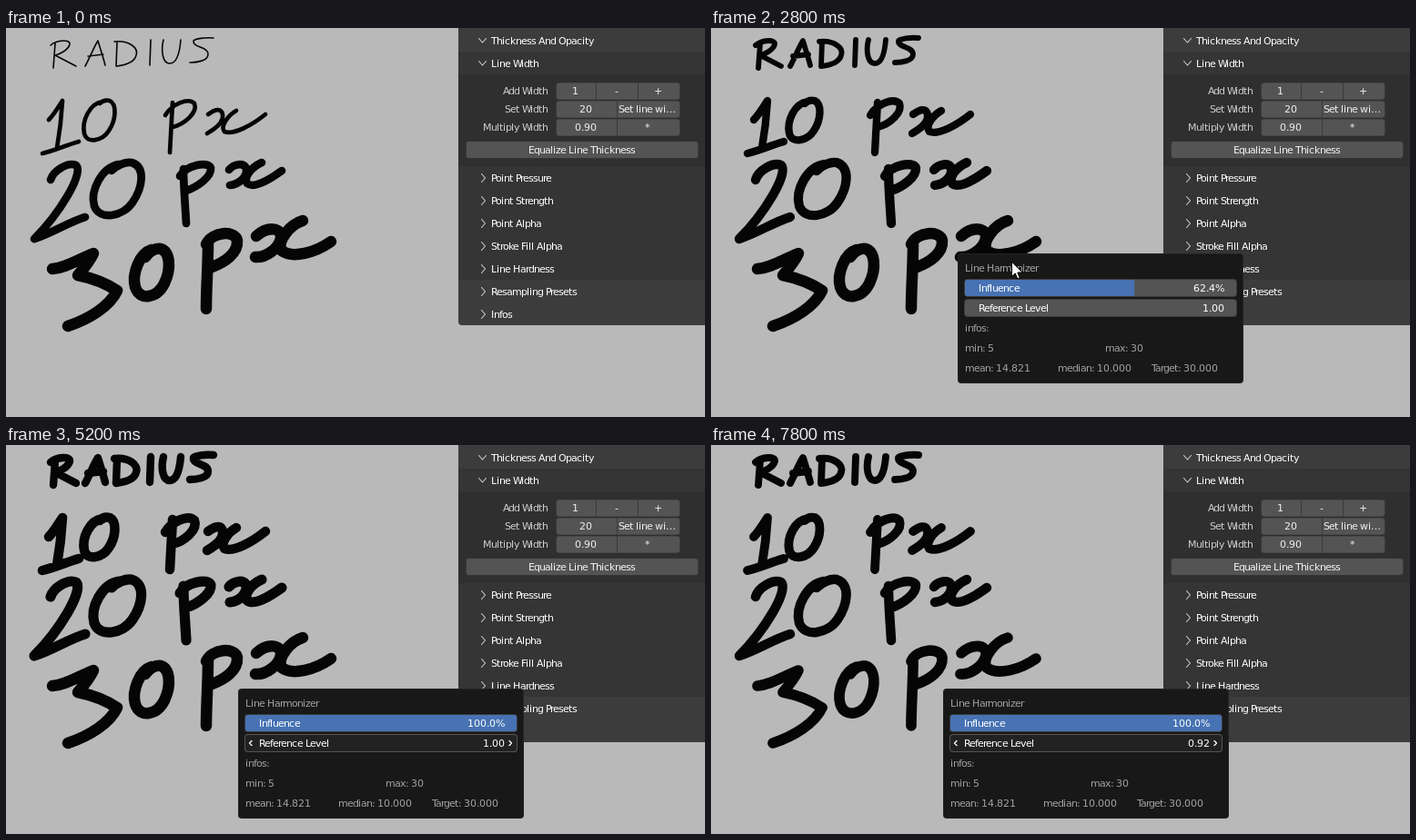
These frames come from a looping animation (768 px wide and 428 px high, 8000 ms). An HTML page with a canvas:

```html
<!DOCTYPE html>
<html lang="en">
<meta charset="utf-8">
<title>Line Harmonizer</title>
<style>
  html, body { margin: 0; overflow: hidden; background: #b9b9b9; }
  canvas { display: block; }
</style>
<canvas id="stage" width="768" height="428"></canvas>
<script>
const ctx = document.getElementById('stage').getContext('2d');
const LOOP = 8000, STEP = 200;
const FAMILY = '"DejaVu Sans", sans-serif';

// Handwriting: centre lines, own line width and width at full harmonizing.
const rows = [
  { base: 1.6, full: 8.4, path: `
    M49 19C56 13 71 12 70 18C68 25 58 29 54 30L77 42M54 17L52 44
    M87 42C92 33 96 22 101 14C104 24 107 33 109 41M90 31L107 29
    M122 15L121 42M119 15C135 13 146 22 143 30C141 38 130 41 121 42
    M159 13L158 41M173 13C170 25 172 39 180 39C188 39 191 25 192 13
    M228 11C218 10 208 12 206 14C205 22 222 20 222 29C222 36 210 38 202 38` },
  { base: 4.7, full: 10.5, path: `
    M47 101C52 96 57 88 62 80C61 98 59 115 56 132M40 138C53 135 66 129 80 125
    M106 81C92 83 83 102 86 116C89 128 106 124 113 113C121 101 122 84 114 80C110 79 106 80 103 83
    M183 82L180 137M175 96C182 84 200 76 207 83C211 93 196 106 183 109
    M222 95C229 90 236 87 238 95C239 104 231 110 221 116
    M253 91C244 96 235 108 240 114C250 118 270 107 285 95` },
  { base: 8.7, full: 11.2, path: `
    M49 167C52 157 68 147 77 151C86 160 58 205 31 232C50 226 68 214 87 208
    M124 150C106 153 92 178 97 196C103 212 128 208 139 192C150 176 154 153 138 148C131 147 122 151 116 157
    M195 155C195 175 197 196 198 215M191 163C198 151 222 146 225 154C226 164 210 175 198 179
    M245 156C250 150 262 147 264 155C265 164 256 172 246 173
    M281 148C268 154 261 165 265 171C272 177 288 168 303 157` },
  { base: 12.5, full: 12.5, path: `
    M51 265C66 264 80 254 96 248C92 257 86 264 79 272C94 275 110 281 122 289C114 306 92 320 68 328
    M160 244C147 248 138 270 142 285C147 301 166 297 174 281C182 264 180 246 170 243C164 242 157 246 153 252
    M222 238C222 262 220 286 220 309M220 238C226 224 252 222 254 234C255 248 240 258 226 263
    M275 229C286 219 303 218 302 231C300 242 286 253 274 252
    M326 212C312 216 297 235 303 245C315 254 340 247 357 235` }
].map(row => ({ ...row, path: new Path2D(row.path) }));

const arrow = new Path2D('M.5.5V16.5L4.3 13 6.8 19 9.3 18 6.8 12H12Z');

// Stepped tracks: [time, value]
const cursorTrack = [
  [0, null], [600, [620, 200]], [800, [632, 136]], [1400, [545, 165]], [1600, [462, 188]],
  [2000, [500, 193]], [2200, [536, 199]], [2400, [478, 214]], [2600, [388, 240]],
  [2800, [330, 257]], [3000, [314, 277]], [3400, [450, 296]], [3600, [458, 302]],
  [3800, null], [4600, [557, 306]], [4800, [553, 318]], [5000, [542, 319]], [5200, null]
];
const popupTrack = [
  [0, null], [1800, [478, 190]], [2400, [420, 205]], [2600, [330, 231]],
  [2800, [272, 248]], [3000, [256, 268]]
];
const influenceTrack = [[0, 0], [1200, 62.4], [3800, 75.8], [4000, 91.6], [4200, 100]];
const levelTrack = [
  [0, 1], [5400, .88], [5600, .58], [5800, .22], [6000, 0], [6800, .06],
  [7000, .2], [7200, .4], [7400, .62], [7600, .8], [7800, .92]
];
const equalizeTrack = [[0, '#545454'], [800, '#656565'], [1000, '#4772b3'], [1200, '#656565'], [1400, '#545454']];

const at = (track, time) => track.findLast(key => key[0] <= time)[1];

// Interface text: advances and kerning are rounded down to whole pixels.
const sizes = {};
function size(str) {
  if (!(str in sizes)) {
    ctx.font = `1100px ${FAMILY}`;
    sizes[str] = ctx.measureText(str).width / 100;
  }
  return sizes[str];
}
const floor = value => Math.floor(value + .01);
const kern = (a, b) => b ? floor(size(a + b) - size(a) - size(b)) : 0;

function text(str, x, y, color = '#fff', align = 0) {
  const chars = [...str];
  const steps = chars.map((ch, i) => floor(size(ch)) + kern(ch, chars[i + 1]));
  x = Math.floor(x - steps.reduce((sum, step) => sum + step, 0) * align);
  ctx.font = `11px ${FAMILY}`;
  ctx.fillStyle = color;
  chars.forEach((ch, i) => {
    ctx.fillText(ch, x, y);
    x += steps[i];
  });
}

function box(x, y, w, h, color, radius = 0) {
  ctx.fillStyle = color;
  ctx.beginPath();
  ctx.roundRect(x, y, w, h, radius);
  ctx.fill();
}

function line(points, color, width = 1.1) {
  ctx.strokeStyle = color;
  ctx.lineWidth = width;
  ctx.beginPath();
  points.forEach(([x, y]) => ctx.lineTo(x, y));
  ctx.stroke();
}

function drawWriting(influence, level) {
  ctx.strokeStyle = '#050505';
  ctx.lineCap = ctx.lineJoin = 'round';
  for (const { base, full, path } of rows) {
    const target = full * (1 + 5 * level) / 6;
    ctx.lineWidth = base + (target - base) * influence / 100;
    ctx.stroke(path);
  }
}

function heading(label, y, open) {
  line(open ? [[519.5, y - 2.5], [523.5, y + 2], [527.5, y - 2.5]]
            : [[522.5, y - 4.5], [526.5, y], [522.5, y + 4.5]], '#d0d0d0');
  text(label, 533, y + 4);
}

function buttonRow(y, label, cells) {
  text(label, 595, y + 13, '#cfcfcf', 1);
  box(604, y, 137, 19, '#3a3a3a', 3);
  cells.forEach(([str, x, end], i) => {
    const left = i === 0 ? 3 : 0, right = i === cells.length - 1 ? 3 : 0;
    box(x, y + .5, end - x, 18, '#545454', [left, right, right, left]);
    text(str, (x + end) / 2 - 1, y + 13, '#f0f0f0', .5);
  });
}

function drawPanel(equalizeColor) {
  box(497, 0, 275, 327, '#3c3c3c', [0, 0, 0, 4]);
  box(497, 26, 271, 251, '#353535');
  box(497, 51, 271, 101, '#2f2f2f');
  heading('Thickness And Opacity', 14, true);
  heading('Line Width', 39, true);
  buttonRow(60, 'Add Width', [['1', 605, 648], ['-', 649, 694], ['+', 695, 740]]);
  buttonRow(80, 'Set Width', [['20', 605, 671], ['Set line wi…', 672, 740]]);
  buttonRow(100, 'Multiply Width', [['0.90', 605, 671], ['*', 672, 740]]);
  box(505, 124.5, 256, 19, '#3a3a3a', 3);
  box(506, 125, 254, 18, equalizeColor, 3);
  text('Equalize Line Thickness', 632.5, 138, '#f4f4f4', .5);
  ['Point Pressure', 'Point Strength', 'Point Alpha', 'Stroke Fill Alpha',
    'Line Hardness', 'Resampling Presets', 'Infos']
    .forEach((label, i) => heading(label, 165 + 25 * i, false));
}

function slider(x, y, label, value, { fill = 0, color = '#545454', arrows = false }) {
  box(x, y, 300, 20, arrows ? '#555' : '#3a3a3a', 4);
  box(x + 1, y + 1, 298, 18, color, 3);
  if (fill) {
    ctx.save();
    ctx.beginPath();
    ctx.rect(x, y, 300 * fill, 20);
    ctx.clip();
    box(x + 1, y + 1, 298, 18, '#4772b3', 3);
    ctx.restore();
  }
  if (arrows) {
    line([[x + 8, y + 7.5], [x + 5.5, y + 10], [x + 8, y + 12.5]], '#fff', 1.3);
    line([[x + 291, y + 7.5], [x + 293.5, y + 10], [x + 291, y + 12.5]], '#fff', 1.3);
  }
  text(label, x + 16, y + 14);
  text(value, x + 286, y + 14, '#fff', 1);
}

function drawPopup([x, y], time, influence, level) {
  const grey = '#a2a2a2';
  box(x - 1, y, 314, 143, '#242424', 4);
  box(x, y + 1, 312, 141, '#181818', 3);
  text('Line Harmonizer', x + 7, y + 20, grey);
  slider(x + 6, y + 28, 'Influence', influence.toFixed(1) + '%', {
    fill: influence / 100,
    color: time >= 3400 && time < 4800 ? '#656565' : '#545454'
  });
  slider(x + 6, y + 50, 'Reference Level', level.toFixed(2), {
    color: time >= 5200 ? '#222' : time >= 4800 ? '#656565' : '#545454',
    arrows: time >= 4800
  });
  text('infos:', x + 7, y + 86, grey);
  text('min: 5', x + 7, y + 108, grey);
  text('max: 30', x + 161, y + 108, grey);
  text('mean: 14.821', x + 7, y + 130, grey);
  text('median: 10.000', x + 109, y + 130, grey);
  text('Target: 30.000', x + 212, y + 130, grey);
}

function drawCursor([x, y]) {
  ctx.save();
  ctx.translate(x, y);
  ctx.fillStyle = '#fff';
  ctx.strokeStyle = '#000';
  ctx.lineWidth = 1;
  ctx.lineJoin = 'miter';
  ctx.fill(arrow);
  ctx.stroke(arrow);
  ctx.restore();
}

function render() {
  const time = Math.floor(performance.now() % LOOP / STEP) * STEP;
  const influence = at(influenceTrack, time), level = at(levelTrack, time);
  const popup = at(popupTrack, time), cursor = at(cursorTrack, time);
  box(0, 0, 768, 428, '#b9b9b9');
  drawWriting(influence, level);
  drawPanel(at(equalizeTrack, time));
  if (popup) drawPopup(popup, time, influence, level);
  if (cursor) drawCursor(cursor);
  requestAnimationFrame(render);
}
render();
</script>
</html>
```
